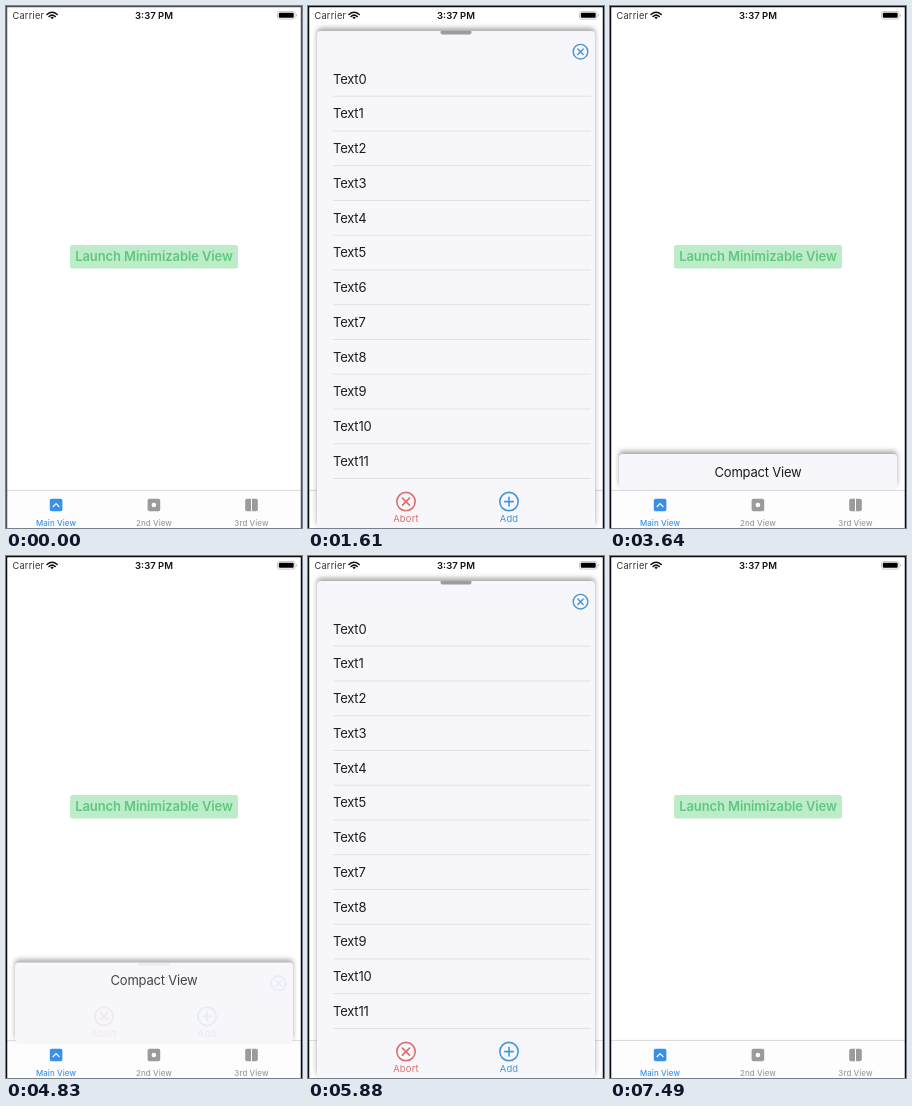
An HTML page for the animation above (7.98 s loop, 296 by 522 pixels).

```html
<!DOCTYPE html>
<html lang="en">
<head>
<meta charset="utf-8">
<title>Minimizable sheet</title>
<style>
  html, body { margin: 0; width: 100%; height: 100%; overflow: hidden; background: #fff; }
  svg { display: block; width: 296px; height: 522px; font-family: Inter, Roboto, sans-serif; }
  .mid { text-anchor: middle; }
  .body { font-size: 13px; letter-spacing: -.22px; fill: #1c1c1e; }
  .tab { font-size: 7.9px; font-weight: 500; letter-spacing: .1px; text-anchor: middle; }
  .tool { font-size: 9.4px; letter-spacing: .2px; text-anchor: middle; stroke: none; }
  .icon { fill: none; stroke-linecap: round; }
  #panel { fill: #f7f6fb; filter: drop-shadow(0 -2.5px 2.7px rgba(0, 0, 0, .34)); }
</style>
</head>
<body>
<svg viewBox="0 0 296 522">
  <defs>
    <clipPath id="listClip"><rect id="listBox" x="9" width="278"/></clipPath>
    <clipPath id="panelClip"><rect id="panelBox" x="9" width="278"/></clipPath>
  </defs>
  <rect width="296" height="522" fill="#fff"/>

  <g id="status">
    <text x="6.5" y="12.9" font-size="9.2" letter-spacing=".25" fill="#333">Carrier</text>
    <g class="icon" stroke="#111" stroke-width="1.6" stroke-linecap="butt">
      <path d="M41 8.5Q46.1 4 51.2 8.5M43 10.5Q46.1 7.8 49.2 10.5"/>
      <path d="M44.4 11.5Q46.1 10.2 47.8 11.5L46.1 13.3Z" fill="#111" stroke="none"/>
    </g>
    <text class="mid" x="148" y="12.9" font-size="9.5" font-weight="600" fill="#111">3:37 PM</text>
    <rect x="271.5" y="5.5" width="17.5" height="7.6" rx="2" fill="none" stroke="#bbb" stroke-width=".8"/>
    <rect x="272.8" y="6.8" width="14.9" height="5" rx="1" fill="#000"/>
    <path d="M290 8v2.8q1-.4 1-1.4t-1-1.4" fill="#bbb"/>
  </g>

  <rect x="64" y="239" width="168" height="23.6" rx="2.5" fill="#bdecc8"/>
  <text class="mid" x="148" y="255.4" font-size="13" font-weight="600" letter-spacing="-.1" fill="#61c780">Launch Minimizable View</text>

  <rect y="484" width="296" height="38" fill="#fdfdfd"/>
  <path d="M0 484.4H296" stroke="#d6d6d8" stroke-width=".9"/>
  <g fill="#3a90e9">
    <rect x="43.8" y="492.8" width="12.6" height="12.4" rx="1.8"/>
    <path class="icon" d="M47.1 500.6l3-3 3 3" stroke="#fff" stroke-width="1.3"/>
    <text class="tab" x="50" y="519.6">Main View</text>
  </g>
  <g fill="#9b9b9b">
    <rect x="141.6" y="492.8" width="12.6" height="12.4" rx="1.8"/>
    <circle cx="147.9" cy="499" r="2.3" fill="#fff"/>
    <text class="tab" x="148" y="519.6">2nd View</text>
    <rect x="239.2" y="492.8" width="12.6" height="12.4" rx="1.8"/>
    <path d="M245.5 492.8v12.4" stroke="#fff" stroke-width="1"/>
    <text class="tab" x="245.5" y="519.6">3rd View</text>
  </g>

  <g id="sheet">
    <rect id="panel" x="9" width="278" rx="4"/>
    <g clip-path="url(#panelClip)">
      <g id="full">
        <g clip-path="url(#listClip)"><g id="rows"></g></g>
        <g id="head">
          <rect x="132.5" y="-.4" width="31" height="3.8" rx="1.8" fill="#9c9ca0"/>
          <g class="icon" stroke="#4596d6" stroke-width="1.4">
            <circle cx="272.5" cy="20.7" r="7.3"/>
            <path d="M269.8 18l5.4 5.4m0-5.4l-5.4 5.4"/>
          </g>
        </g>
        <g id="tools">
          <g class="icon" stroke="#d9706e" stroke-width="1.6">
            <circle cx="98" cy="-26.4" r="9.2"/>
            <path d="M94.5-29.9l7 7m0-7l-7 7"/>
            <text class="tool" x="98" y="-5.9" fill="#d9706e">Abort</text>
          </g>
          <g class="icon" stroke="#4596d6" stroke-width="1.6">
            <circle cx="201" cy="-26.4" r="9.2"/>
            <path d="M196.7-26.4h8.6m-4.3-4.3v8.6"/>
            <text class="tool" x="201" y="-5.9" fill="#4596d6">Add</text>
          </g>
        </g>
      </g>
      <text id="compact" class="body mid" x="148">Compact View</text>
    </g>
  </g>
  <path id="frame" d="M.6 522V.5H295.4V522" fill="none" stroke-width="1.3"/>
</svg>
<script>
const LOOP = 7980, STEP = 70, ROW = 34.75;
const OPEN = { top: 25, bottom: 522 }, MINI = { top: 448, bottom: 483 };
const TRAVEL = 500, STIFF = 15;
const el = id => document.getElementById(id);
const set = (id, attrs) => { for (const k in attrs) el(id).setAttribute(k, attrs[k]); };
const mix = (a, b, p) => a + (b - a) * p;

// Critically damped spring from 0 to 1, time in ms
function spring(ms) {
  const x = Math.max(0, ms) / 1000 * STIFF;
  return 1 - (1 + x) * Math.exp(-x);
}

el('rows').innerHTML = Array.from({ length: 12 }, (_, i) => {
  const y = i * ROW;
  return `<text class="body" x="25" y="${y + 52.6}">Text${i}</text>` +
    `<path d="M25 ${y + 65.2}H283" stroke="#dfdfe2" stroke-width=".9"/>`;
}).join('');

function draw(t) {
  const shown = t >= 770 && t < 7490;
  set('frame', { stroke: t < 770 ? '#505054' : '#0c0c0e' });
  set('sheet', { visibility: shown ? 'visible' : 'hidden' });
  if (!shown) return;

  const slide = TRAVEL * (t < 6980 ? 1 - spring(t - 750) : spring(t - 6980));
  const open = t < 4795 ? 1 - spring(t - 2710) : spring(t - 4795);
  const top = mix(MINI.top, OPEN.top, open) + slide;
  const bottom = mix(MINI.bottom, OPEN.bottom, open) + slide;
  const box = { y: top, height: bottom - top };

  set('panel', box);
  set('panelBox', box);
  set('listBox', { y: top, height: Math.max(0, bottom - 45 - top) });
  set('rows', { transform: `translate(0 ${top})` });
  set('head', { transform: `translate(0 ${top})` });
  set('tools', { transform: `translate(0 ${bottom})` });
  set('full', { opacity: open });
  set('compact', { y: top + 22.8, opacity: (1 - open) ** 2 });
}

const start = performance.now();
function tick() {
  const t = (performance.now() - start) % LOOP;
  draw(Math.floor(t / STEP) * STEP);
  requestAnimationFrame(tick);
}
tick();
</script>
</body>
</html>
```
